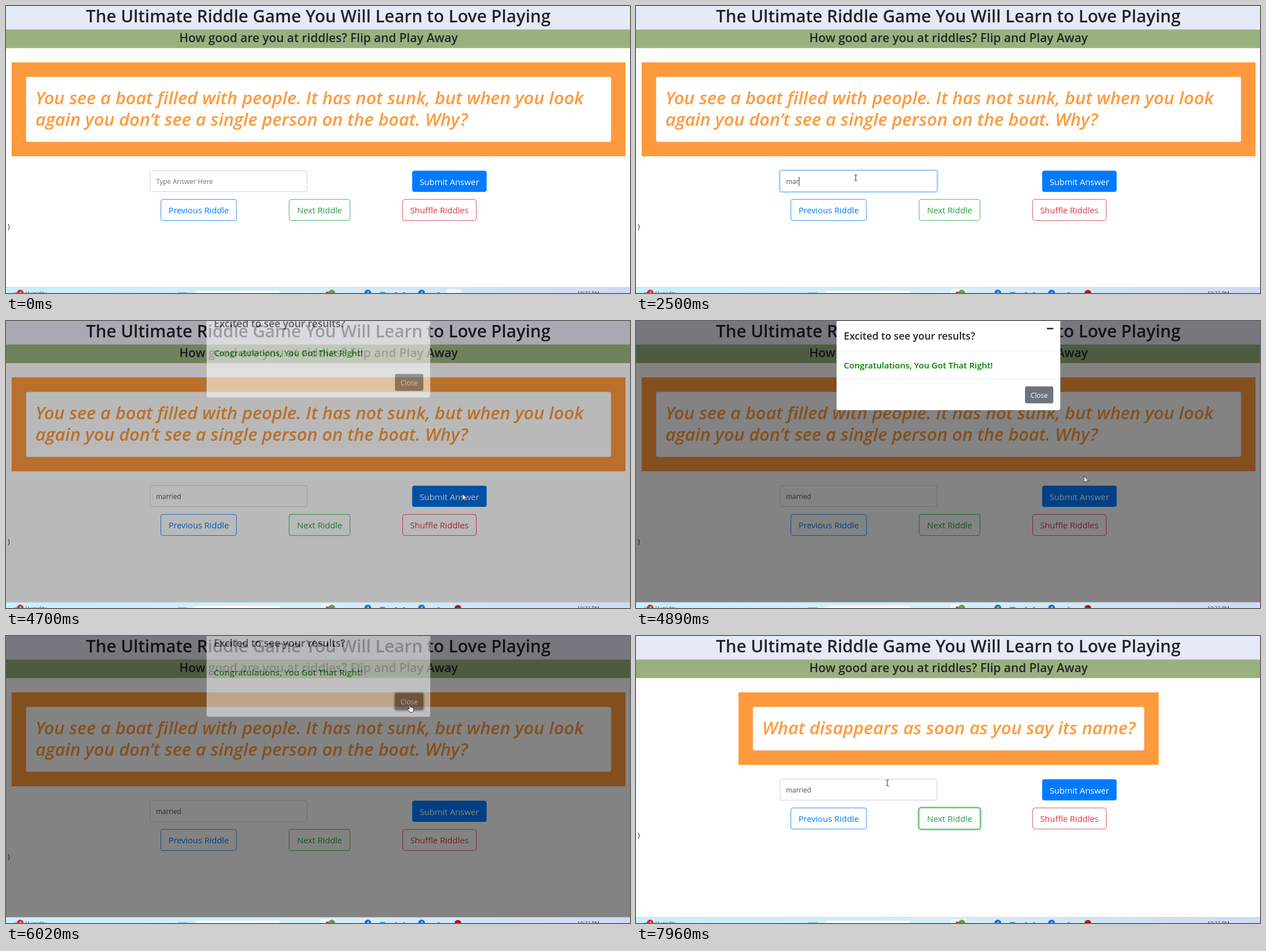
Write an HTML page that moves like this. It is 1102 px wide and 508 px high and loops after 8000 ms.

```html
<!DOCTYPE html>
<html lang="en">
<head>
<meta charset="utf-8">
<title>Riddle game</title>
<style>
  html, body { margin: 0; width: 100%; height: 100%; overflow: hidden; background: #fefefe; }
  svg { display: block; }
  text { font-family: "Open Sans", "Noto Sans", sans-serif; white-space: pre; }
  .semi { font-weight: 600; }
  .mid { text-anchor: middle; }
  .riddle { font-size: 31.33px; font-weight: 600; font-style: italic; fill: #ff9a3c; }
  .btn { font-size: 14.95px; text-anchor: middle; }
  .outline { fill: #fff; stroke-width: .85; }
  .field { font-size: 11.9px; }
  .bar { font-size: 9px; fill: #333; }
  .ring { fill: none; stroke-width: 2.5; }
</style>
</head>
<body>
<svg width="1102" height="508" viewBox="0 0 1102 508">
  <defs>
    <linearGradient id="sky">
      <stop offset="0" stop-color="#c8effb"/>
      <stop offset=".5" stop-color="#d6eef8"/>
      <stop offset="1" stop-color="#cfdaf4"/>
    </linearGradient>
  </defs>
  <rect width="1102" height="508" fill="#fefefe"/>
  <rect width="1102" height="41.5" fill="#e6e9f6"/>
  <rect y="41.5" width="1102" height="33" fill="#9ab17f"/>
  <g class="semi mid" fill="#212529">
    <text x="551.5" y="29" font-size="30.13">The Ultimate Riddle Game You Will Learn to Love Playing</text>
    <text x="552" y="64" font-size="21.28">How good are you at riddles? Flip and Play Away</text>
  </g>

  <rect id="frame" y="99.7" fill="#ff9a3c"/>
  <rect id="card" y="125.5" rx="3" fill="#fff" stroke="#e5cfbc" stroke-width=".8"/>
  <g id="first" class="riddle">
    <text x="52" y="174">You see a boat filled with people. It has not sunk, but when you look</text>
    <text x="52" y="212">again you don’t see a single person on the boat. Why?</text>
  </g>
  <text id="second" class="riddle mid" x="552.5" y="174">What disappears as soon as you say its name?</text>

  <g id="lower">
    <rect id="inputRing" class="ring" x="253.2" y="290.2" width="279.6" height="39.6" rx="4.5" stroke="#007bff"/>
    <rect id="input" x="254.5" y="291.5" width="277" height="37" rx="3" fill="#fff"/>
    <text id="answer" class="field" x="265" y="315.3"></text>
    <rect id="caret" y="302.5" width="1" height="16" fill="#222"/>

    <rect id="submitRing" class="ring" x="715.8" y="290.2" width="134.4" height="39.6" rx="5" stroke="#007bff"/>
    <rect id="submit" x="717.3" y="291.5" width="131.5" height="37.5" rx="4"/>
    <text class="btn" x="783" y="316.7" fill="#fff">Submit Answer</text>

    <rect class="outline" x="273.5" y="342.3" width="133.5" height="37.4" rx="4" stroke="#007bff"/>
    <text class="btn" x="340.3" y="366.8" fill="#007bff">Previous Riddle</text>

    <rect id="nextRing" class="ring" x="498.6" y="341.2" width="110.3" height="39.6" rx="5" stroke="#28a745"/>
    <rect id="next" class="outline" x="500" y="342.3" width="107.5" height="37.4" rx="4" stroke="#28a745"/>
    <text id="nextLabel" class="btn" x="553.8" y="366.8">Next Riddle</text>

    <rect class="outline" x="700.5" y="342.3" width="130" height="37.4" rx="4" stroke="#dc3545"/>
    <text class="btn" x="765.3" y="366.8" fill="#dc3545">Shuffle Riddles</text>
    <text x="3" y="395" font-size="12" fill="#212529">)</text>
  </g>

  <rect id="backdrop" width="1102" height="498"/>
  <g id="modal">
    <rect x="354" y="-6" width="395.5" height="164.5" rx="4" fill="#fff" stroke="#000" stroke-opacity=".2" stroke-width=".8"/>
    <path d="M354 53.5H749M354 103.5H749" stroke="#e9ecef" stroke-width=".8"/>
    <rect x="725.5" y="12.7" width="11.5" height="2.7" rx="1" fill="#333"/>
    <text class="semi" x="367" y="34" font-size="17.75" fill="#212529">Excited to see your results?</text>
    <text class="semi" x="367" y="85" font-size="15.05" fill="#008000">Congratulations, You Got That Right!</text>
    <rect id="closeRing" class="ring" x="685.8" y="115" width="52.4" height="32.6" rx="4.5" stroke="#6c757d" stroke-opacity=".5"/>
    <rect id="close" x="687" y="116.3" width="50" height="30" rx="3"/>
    <text class="mid" x="712" y="136.3" font-size="12" fill="#fff">Close</text>
  </g>

  <g id="taskbar">
    <rect y="498" width="1102" height="10" fill="url(#sky)"/>
    <path d="M0 498H1102" stroke="#b9cfdc" stroke-width=".8"/>
    <path d="M14 507.5H24M303 507.5H320" stroke="#7fa3bd"/>
    <circle cx="25" cy="508" r="6" fill="#d92b2b"/>
    <text class="bar" x="34" y="512">Humidity</text>
    <rect x="333" y="504" width="152" height="12" rx="6" fill="#f8fcff"/>
    <rect id="tabA" x="778" y="501" width="27" height="12" rx="3" fill="#eef4fd"/>
    <rect id="tabB" x="556" y="501" width="27" height="12" rx="3" fill="#eef7fd"/>
    <rect x="565" y="505.5" width="10" height="6" fill="#b5443c"/>
    <circle cx="575.5" cy="508" r="6" fill="#6f9a4b"/>
    <g fill="#0f6fd0">
      <circle cx="639" cy="508" r="6"/>
      <circle cx="734" cy="508" r="6"/>
    </g>
    <rect x="660" y="506" width="10" height="4" rx="2" fill="#3fa4dc"/>
    <path d="M687 507.5h4M701 507.5h4M762 507.5h4" stroke="#60829f" stroke-width="1.5"/>
    <circle id="badge" cx="798" cy="508.5" r="6" fill="#b3161c"/>
    <g fill="#fff" font-size="8" class="mid semi">
      <text x="25" y="511">4</text><text x="639" y="511">4</text><text x="734" y="511">4</text>
    </g>
    <text class="bar" x="1009" y="512">10:22 PM</text>
  </g>

  <g id="cursor" stroke-linejoin="round">
    <path id="arrow" d="M0 0V11L2.6 8.6 4.3 12.3 6 11.5 4.4 8H8Z" fill="#fff" stroke="#222" stroke-width=".8"/>
    <path id="beam" d="M-2.5 -5H-.6L0 -4.4 .6 -5H2.5M0 -4.4V4.4M-2.5 5H-.6L0 4.4 .6 5H2.5" fill="none" stroke="#222"/>
    <path id="hand" d="M-1 1Q0 -.6 1 1V5Q2.2 4.2 3 5.4 4.2 4.7 5 6 6.6 5.6 6.8 7.2V10Q6.6 12 5.6 14H.4Q-.8 12-3.6 9.2-4.4 7.4-2.6 7.6L-1 9Z" fill="#fff" stroke="#222" stroke-width=".9"/>
  </g>
</svg>
<script>
const $ = Object.fromEntries([...document.querySelectorAll('[id]')].map(e => [e.id, e]));
const LOOP = 8000, FADE = 150, OPEN = 4616, SHUT = 5944, CHANGE = 7160;

const ramp = (t, from, ms = FADE) => Math.min(1, Math.max(0, (t - from) / ms));
const between = (t, a, b) => t >= a && t < b;
const smooth = k => k * k * (3 - 2 * k);
const linear = k => k;
const easeOut = k => 1 - (1 - k) ** 2;
const mix = (a, b, k) => `rgb(${a.map((v, i) => Math.round(v + (b[i] - v) * k))})`;
const set = (el, attrs) => { for (const name in attrs) el.setAttribute(name, attrs[name]); };
const show = (el, on) => { el.style.display = on ? '' : 'none'; };

// time, x, y, easing towards this point
const path = [
  [120, 1015, 510], [920, 278, 312], [980, 278, 312], [1310, 388, 304],
  [3830, 388, 304], [4010, 590, 267, linear], [4210, 820, 304, easeOut], [4420, 806, 306],
  [4700, 806, 306], [5360, 733, 152], [5420, 733, 152], [5560, 713, 121],
  [6200, 713, 121], [6690, 550, 394], [6760, 550, 394], [7020, 548, 358],
  [7690, 548, 358], [7960, 444, 260, easeOut]
];
const typing = [[1970, 1], [2170, 2], [2500, 3], [2700, 4], [2900, 5], [3100, 6], [3300, 7]];

function pointer(t) {
  const i = path.findIndex(p => p[0] > t);
  if (i === 0) return [1015, 520];
  if (i < 0) return path.at(-1).slice(1, 3);
  const [t0, x0, y0] = path[i - 1], [t1, x1, y1, ease = smooth] = path[i];
  const k = ease((t - t0) / (t1 - t0));
  return [x0 + (x1 - x0) * k, y0 + (y1 - y0) * k];
}

function cursorKind(t, x, y, shift) {
  const over = (l, top, r, b) => x >= l && x <= r && y >= top && y <= b;
  if (between(t, OPEN, SHUT + 300)) return over(687, 116, 737, 147) ? 'hand' : 'arrow';
  if (over(254, 291 - shift, 532, 329 - shift)) return 'beam';
  const onButton = over(717, 291 - shift, 849, 329 - shift) || over(500, 342 - shift, 608, 380 - shift);
  return onButton ? 'hand' : 'arrow';
}

function drawField(t) {
  const count = typing.reduce((n, [at, c]) => t >= at ? c : n, 0);
  $.answer.textContent = count ? 'married'.slice(0, count) : 'Type Answer Here';
  set($.answer, { fill: count ? '#495057' : '#6c757d' });
  const focus = ramp(t, 1110) - ramp(t, 4570, 100);
  set($.inputRing, { 'stroke-opacity': focus * .25 });
  set($.input, { stroke: mix([206, 212, 218], [128, 189, 255], focus) });
  show($.caret, between(t, 1110, 1640) || between(t, 1970, 3830) || between(t, 4360, 4570));
  set($.caret, { x: 265 + (count ? $.answer.getComputedTextLength() : 0) });
}

function drawButtons(t) {
  const hover = ramp(t, 4130, 100) - ramp(t, 4660);
  set($.submit, { fill: mix([0, 123, 255], [0, 105, 217], hover) });
  set($.submitRing, { 'stroke-opacity': t < CHANGE ? ramp(t, 6400) * .5 : 0 });
  const passing = .35 * (ramp(t, 7712, 53) - ramp(t, 7765, 100));
  const tint = ramp(t, 6883, 137) - ramp(t, 7200) + passing;
  set($.next, { fill: mix([255, 255, 255], [40, 167, 69], tint) });
  set($.nextLabel, { fill: mix([42, 157, 69], [255, 255, 255], tint) });
  set($.nextRing, { 'stroke-opacity': ramp(t, CHANGE, 100) * .5 });
}

function drawModal(t) {
  // the slide begins one screen refresh after the fade
  const slide = easeOut(ramp(t, OPEN + 12, 300)) - easeOut(ramp(t, SHUT + 12, 300));
  const alpha = ramp(t, OPEN) - ramp(t, SHUT);
  set($.backdrop, { opacity: .485 * (ramp(t, OPEN) - ramp(t, SHUT + 300)) });
  set($.modal, { opacity: alpha, transform: `translate(0 ${-39.5 * (1 - slide)})` });
  set($.close, { fill: mix([108, 117, 125], [84, 91, 98], ramp(t, 5430, 130)) });
  show($.closeRing, t >= 5890);
}

function draw() {
  const t = performance.now() % LOOP;
  const changed = t >= CHANGE, shift = changed ? 38 : 0;
  set($.frame, changed ? { x: 181, width: 742, height: 128.3 } : { x: 10, width: 1084, height: 166.3 });
  set($.card, changed ? { x: 206.5, width: 691, height: 77 } : { x: 35.5, width: 1033, height: 115 });
  show($.first, !changed);
  show($.second, changed);
  set($.lower, { transform: `translate(0 ${-shift})` });

  drawField(t);
  drawButtons(t);
  drawModal(t);
  show($.tabA, t < 250);
  show($.tabB, t >= 250);
  show($.badge, t >= 1050);

  const [x, y] = pointer(t), kind = cursorKind(t, x, y, shift);
  set($.cursor, { transform: `translate(${x} ${y})` });
  for (const name of ['arrow', 'beam', 'hand']) show($[name], name === kind);
  requestAnimationFrame(draw);
}
draw();
</script>
</body>
</html>
```
